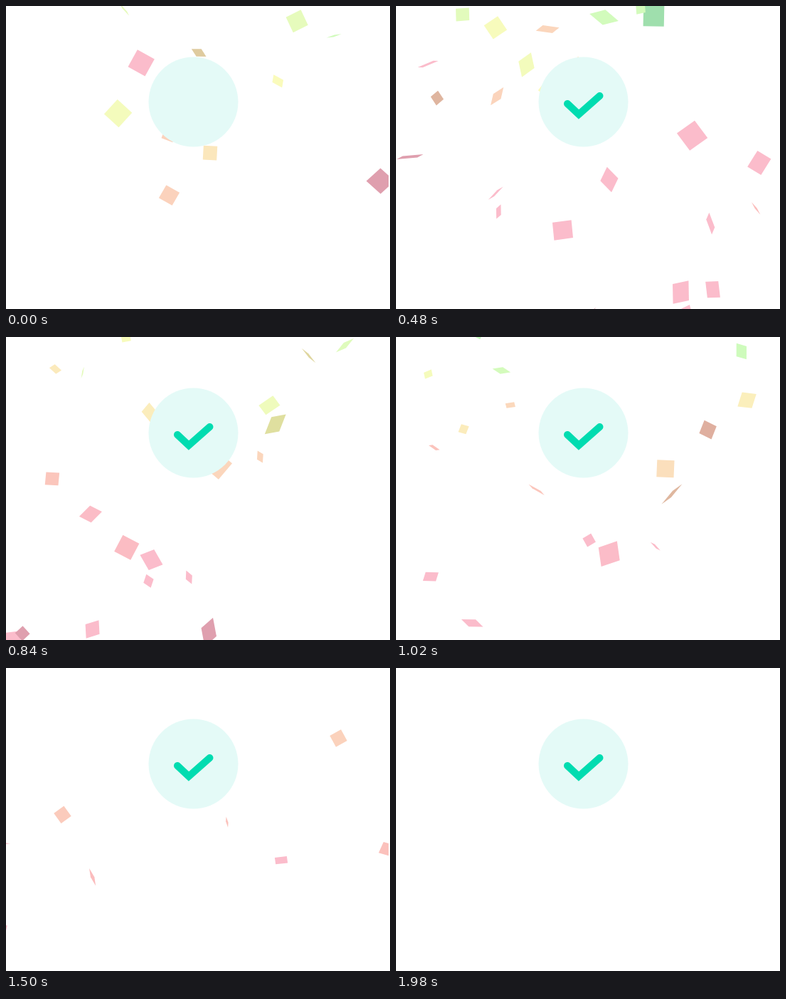
Write an HTML page with a canvas that moves like this. It is 540 by 425 pixels and loops after 2.94 s.

```html
<!DOCTYPE html>
<html lang="en">
<head>
<meta charset="utf-8">
<title>Success confetti</title>
<style>
  html, body { margin: 0; width: 100%; height: 100%; overflow: hidden; background: #fff; }
  canvas { display: block; width: 540px; height: 425px; }
</style>
</head>
<body>
<canvas id="stage" width="540" height="425"></canvas>
<script>
const ctx = document.getElementById('stage').getContext('2d');

const LOOP = 2940, STEP = 60, END = 1980;
const MID = 265;          // pieces spread sideways from here
const HALF_G = 0.00045;   // half of gravity, px per ms squared
const SPREAD = 0.00043;
const MIN_AGE = 150;      // pieces show only once they fall
const SMALL = 16;

// x, height of the top of the arc, time at the top; largest piece first
const ARCS = [
  [396, -215, -459], [47, -133, -395], [281, -180, -309], [296, -31, 157],
  [383, 3, 325], [357, -611, -1020], [495, -119, -900], [152, 46, -482],
  [203, -404, -1037], [240, -195, -584], [477, -181, -464], [179, -20, 3],
  [296, -101, -395], [215, -178, -204], [70, -267, -400], [377, 1, 381],
  [421, -57, -417], [134, -79, -13], [404, -259, -728], [497, -55, 455],
  [147, -90, -214], [231, 45, -700], [202, -43, 264], [164, -274, -612],
  [429, -111, 288], [287, 43, -602], [516, -21, 718], [78, -59, 83],
  [134, -2, 690], [459, -122, 800], [90, -38, 764], [373, -82, 616]
];

function rand(i, k) {
  const v = Math.sin((i + 1) * 12.9898 + k * 78.233) * 43758.5453;
  return v - Math.floor(v);
}

function makePiece([x, top, start], size, i) {
  return {
    x, top, start, size,
    turn: rand(i, 1) * 2 * Math.PI,
    spin: (rand(i, 2) - 0.5) * 0.008,
    skew: rand(i, 3) * 2 * Math.PI,
    flip: rand(i, 4) * 2 * Math.PI,
    flipRate: 0.002 + rand(i, 5) * 0.005,
    dark: rand(i, 6) < 0.15
  };
}

const pieces = ARCS.map((arc, i) => makePiece(arc, 31 - 0.45 * i, i));
for (let n = 0; n < SMALL; n++) {
  const i = ARCS.length + n;
  const arc = [20 + 500 * rand(i, 7), -130 * rand(i, 8), 95 * n - 700];
  pieces.push(makePiece(arc, 17 - 0.4 * n, i));
}

function drawPiece(p, t) {
  const age = t - p.start;
  if (age <= MIN_AGE) return;
  const x = MID + (p.x - MID) * Math.exp(SPREAD * (age - 600));
  const y = p.top + HALF_G * age * age;
  if (y < -40 || y > 465) return;

  const hue = Math.max(-14, 165 - 0.205 * age);
  const c = Math.cos(p.flip + p.flipRate * t);
  ctx.save();
  ctx.translate(x, y);
  ctx.rotate(p.turn + p.spin * t);
  ctx.scale(1, Math.max(0.12, Math.abs(c)));
  ctx.rotate(p.skew);
  ctx.fillStyle = `hsl(${(hue + 360) % 360}, ${p.dark ? '50%, 75%' : '88%, 86%'})`;
  ctx.fillRect(-p.size / 2, -p.size / 2, p.size, p.size);
  ctx.restore();
}

function drawCheck(t) {
  const left = Math.max(0, 1 - t / 300);
  const done = 1 - left * left;
  if (done <= 0) return;
  const down = Math.hypot(16, 15), up = Math.hypot(29.5, 26);
  const len = done * (down + up);
  const a = Math.min(1, len / down);
  const b = Math.max(0, (len - down) / up);

  ctx.beginPath();
  ctx.moveTo(241, 137);
  ctx.lineTo(241 + 16 * a, 137 + 15 * a);
  if (b > 0) ctx.lineTo(257 + 29.5 * b, 152 - 26 * b);
  ctx.lineWidth = 10;
  ctx.lineCap = 'round';
  ctx.lineJoin = 'miter';
  ctx.strokeStyle = '#00dcb0';
  ctx.stroke();
}

function draw(t) {
  ctx.fillStyle = '#fff';
  ctx.fillRect(0, 0, 540, 425);

  if (t < END) {
    ctx.save();
    ctx.beginPath();
    ctx.rect(0, 0, 538, 425);
    ctx.clip();
    pieces.forEach(p => drawPiece(p, t));
    ctx.restore();
  }

  ctx.fillStyle = '#e4faf7';
  ctx.beginPath();
  ctx.arc(263.5, 134.5, 63, 0, Math.PI * 2);
  ctx.fill();
  drawCheck(t);
}

const begin = performance.now();
function tick() {
  const t = (performance.now() - begin) % LOOP;
  draw(Math.min(END, Math.floor(t / STEP) * STEP));
  requestAnimationFrame(tick);
}
tick();
</script>
</body>
</html>
```
